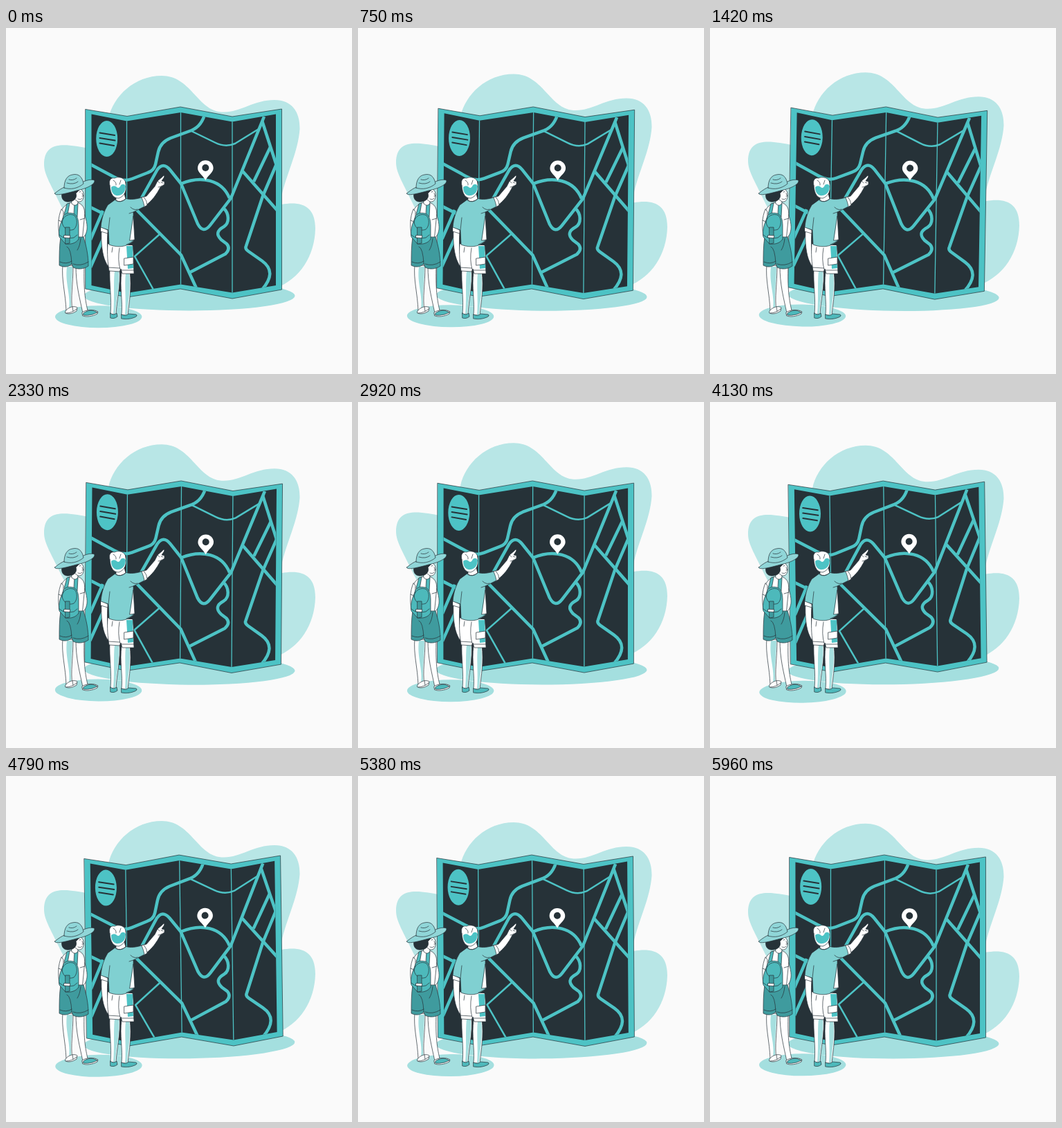
Recreate the animation shown at these times as an HTML page. Size 500x500 px, loop 6000 ms.

```html
<!DOCTYPE html>
<html lang="en">
<head>
<meta charset="utf-8">
<title>Travellers at a map</title>
<style>
  html, body { margin: 0; width: 100%; height: 100%; overflow: hidden; background: #fafafa; }
  svg { display: block; width: 100%; height: 100%; }
  .ink { stroke: #263238; stroke-width: .7; stroke-linejoin: round; stroke-linecap: round; }
  .line { fill: none; }
  .white { fill: #fff; }
  .dark { fill: #263238; }
  .teal { fill: #4dc3c5; }
  .cloth { fill: #80d0d1; }
  .hat { fill: #90d6d8; }
  .pack { fill: #4db9bb; }
  .deep { fill: #3f9b9e; }
  .pale { fill: #a5dfdf; stroke: none; }
  .road { fill: none; stroke: #4dc3c5; stroke-width: 4.5; stroke-linejoin: round; }
  .thin { stroke-width: 2.5; }
  .fold { stroke-width: 1.3; }
</style>
</head>
<body>
<svg viewBox="0 0 500 500">
  <defs>
    <clipPath id="panels">
      <path id="sheet" d="M123.500 124.500L174.500 134.500 252.500 122 327 135.500 390 124.500V372L327 382.500 252.500 370.500 174.500 383 123.500 372Z"/>
    </clipPath>
  </defs>

  <path id="blob" fill="#b8e6e6" d="M148 131C155 98 186 69 225 69C266 69 276 116 308 121C335 125 356 104 388 104C413 104 425 121 424.500 146C422 180 406 208 398 244V255C427 250 447 257 447 290C446 330 425 362 390 376L200 350C160 340 100 300 80 258C66 228 55 212 55 197C55 161 88 168 120 174Z"/>

  <g id="shadow" fill="#a4dfdf">
    <ellipse cx="265" cy="387" rx="152.500" ry="21.500"/>
    <ellipse cx="133.700" cy="417.300" rx="62.700" ry="16"/>
  </g>

  <g id="map">
    <path class="teal ink" d="M115 117.500L175 127.500 252 114 327 128 398.500 117V378L327 391 252 377 175 389 115 377Z"/>
    <use href="#sheet" class="dark"/>
    <g clip-path="url(#panels)">
      <path class="road" d="M118 195L150 212C164 220 172 222 182 218L205 209Q214 206 216 197L220 179Q223 165 238 159L268 148Q283 142 288 122"/>
      <path class="road" d="M189 258L218.500 205Q227 193 237 205L253 225 277 283Q285 298 295 285L325 246 373 128"/>
      <path class="road" d="M253 225C282 213 312 219 323 246"/>
      <path class="road thin" d="M266 148L302 165.500Q317 173 331 167L365 146"/>
      <path class="road" d="M370 134L392 202"/>
      <path class="road" d="M382 172L358 222M392 194L371 243L347 315Q345 319 350 322.500L370 336.500C386 348 384 362 370 378"/>
      <path class="road" d="M342 207L394 266"/>
      <path class="road" d="M314 260C323 268 323 282 315 287C304 293 304 299 311 306L319 312Q325 319 317 326.500L266 353"/>
      <path class="road" d="M180 254L253 328 276 378"/>
      <path class="road thin" d="M222 298L186 330 213 378"/>
      <path class="road" d="M118 257L150 273M140 264L122 306M122 346L146 292"/>
      <path class="road fold" d="M174.500 128V388M252.500 115V377M327 129V390"/>
    </g>
    <ellipse class="teal" cx="145.700" cy="160" rx="15.500" ry="26"/>
    <path class="line" stroke="#263238" stroke-width="2" stroke-linecap="round" d="M135.500 151.500L157 155M135.500 159L157.500 162.500M135.500 166.500L156 170"/>
    <path class="white" d="M288.300 220C284 212 277 209 277 202.500A11.300 11.300 0 0 1 299.600 202.500C299.600 209 292.500 212 288.300 220Z"/>
    <circle class="dark" cx="288.300" cy="202" r="5"/>
  </g>

  <g id="woman" class="ink">
    <path class="white" d="M82 342C80 365 86 382 87 409L96 408C93 390 97 370 97 344Z"/>
    <path class="pale" d="M88 345L96 345C96 370 92 388 95 407L91 407C94 385 85 370 88 345Z"/>
    <path class="white" d="M101 344C101 371 106 388 111 412L119 412C114 393 112 376 113 343Z"/>
    <path class="white" d="M86 409C90 403 99 401 103 404L102 409C96 413 90 414 86 412Z"/>
    <path class="white" d="M110 411C115 407 127 406 133 410L132 413C125 417 116 418 111 416Z"/>
    <path class="line" d="M87 412Q95 412 102 406M96 403L97 409"/>
    <path class="pack" d="M112 412C119 407 126 407 132 411L125 414Q117 416 112 415Z"/>
    <path class="white" d="M109 260C114 268 118 282 117 291C116 299 112 304 108 303L106 274Z"/>
    <path class="white" d="M81 262C87 253 95 250 105 253C113 256 115 264 113 277L110 308 80 308Z"/>
    <path class="white" d="M80 262C75 273 75 286 77 300L82 301 83 266Z"/>
    <path class="line" d="M107 277L114 275M76 278L81 280"/>
    <path class="deep" d="M79 302L112 302C116 315 119 328 119 344C111 349 104 349 97 346L95 341C90 346 83 346 77 343C77 328 77 315 79 302Z"/>
    <path class="line" d="M88 316Q94 318 95 341M108 304Q107 315 103 321M78 338Q87 342 95 337M97 341Q108 345 119 338"/>
    <path class="pack" d="M84 269L88 254 92 253 89 270ZM98 269L99 252 104 254 103 273Z"/>
    <path class="pack" d="M82 275C83 268 90 266 97 268C103 270 105 277 105 286V305C101 311 94 313 86 312L77 302C75 292 79 282 82 275Z"/>
    <path class="line" d="M81 281C82 271 92 267 99 271C104 276 103 287 98 291C91 294 83 291 81 281ZM77 299Q84 306 98 303L103 299"/>
    <path class="deep" d="M86 288H92V311L86 312Z"/>
    <path class="white" d="M84 299.500L93 300 92 303.500 84 303Z"/>
    <path class="white" d="M94 243L95 254Q101 259 104 253L103 245Z"/>
    <path class="white" d="M97 233C103 230 111 232 112 239C113 247 110 252 104 251L96 245Z"/>
    <path class="dark" d="M81 237C79 247 83 252 92 251C100 250 103 244 101 239L106 234 90 230Z"/>
    <path class="line" d="M106 237L108 236.500M110 239L112 243 110 243M104 247Q108 249 110 246"/>
    <path class="hat" d="M70.500 239C76 234 82 231 86 229L112 222C121 218 128 219 128 221C128 226 117 232 102 235C84 240 70 243 70.500 239Z"/>
    <path class="hat" d="M84 231C84 219 89 213 96 212C104 210 110 214 112 225C104 232 93 234 84 231Z"/>
    <path class="line" d="M88 224Q98 227 104 222M91 219Q97 221 102 217"/>
  </g>

  <g id="man" class="ink">
    <path class="white" d="M150 348C149 370 153 389 151 414L159 414C160 393 166 372 164 348Z"/>
    <path class="pale" d="M157 350H163C165 373 159 392 158 413L155 413C157 390 155 370 157 350Z"/>
    <path class="white" d="M167 352C164 376 169 393 167 415L176 415C178 395 182 376 179 352Z"/>
    <path class="pale" d="M173 354H178C181 377 176 394 175 415L172 415C174 392 171 373 173 354Z"/>
    <path class="pack" d="M151 412Q155 416 160 412L161 417Q156 421 151 419Z"/>
    <path class="pack" d="M167 414Q174 417 177 413L188 414Q191 416 186 418C179 421 172 421 167 420Z"/>
    <path class="white" d="M138 291C137 309 139 328 144 338L147 344 150 338C146 326 146 309 147 294Z"/>
    <path class="white" d="M147 312C146 327 147 339 149 351L164 352 166 348 168 355 185 355C184 340 185 328 183 314Z"/>
    <path class="teal" stroke="none" d="M174 315H183L184 347 176 348Z"/>
    <path class="white" d="M171 333L184 331V341L171 343Z"/>
    <path class="line" d="M164 318Q161 335 165 349M148 346L164 347M167 350L185 350M154 317L153 324"/>
    <path class="white" d="M195 245L203 243 215 229 219 221 225 216 228 213Q230 214 227 218L225 221 229 222 229 226 223 230C218 240 211 250 201 257Z"/>
    <path class="line" d="M219 221L222 224M224 223L227 224M220 230Q223 230 225 228"/>
    <path class="white" d="M194 245L199 244Q204 250 204 256L199 259Z"/>
    <path class="white" d="M137 287L147 292 147 297 137 294Z"/>
    <path class="cloth" d="M158 248L172 246C181 249 188 247 196 245Q199 252 200 258L184 266 185 307C174 318 159 317 149 313L148 292 137 288C138 275 142 264 147 256Z"/>
    <path class="white" d="M184 272L186 306 179 307Z"/>
    <path class="line" d="M148 292L150 274M184 266L178 268M190 262Q185 264 180 259M174 313Q181 311 185 306"/>
    <path class="white" d="M159 240L159 249Q165 253 173 247L171 240Z"/>
    <path class="line" d="M158 249Q165 254 173 247"/>
    <path class="white" d="M150 228C148 219 152 216 157 217C162 214 173 216 173 225C175 233 172 243 163 246C155 246 151 240 150 228Z"/>
    <path class="teal" stroke="none" d="M152 230Q155 227 159 229Q163 234 166 227Q170 224 173 228C173 236 169 241 163 242C156 243 152 238 152 230Z"/>
    <path class="line" d="M150 235Q148 239 153 241M155 220Q160 223 159 227M166 220L164 226"/>
  </g>
</svg>
<script>
  const LOOP = 6000;
  const [blob, shadow, map] = ['blob', 'shadow', 'map'].map(id => document.getElementById(id));

  // Triangle wave: 0, 1, 0, -1, 0 over one turn.
  const sway = p => 1 - 4 * Math.abs((p + .25) % 1 - .5);
  const rotate = (el, angle, x, y) => el.setAttribute('transform', `rotate(${angle} ${x} ${y})`);

  function draw() {
    const p = performance.now() % LOOP / LOOP;
    const lift = 10 * (1 - Math.abs(2 * p - 1));
    blob.setAttribute('transform', `translate(0 ${-lift})`);
    rotate(map, sway(p), 256.7, 252.5);
    rotate(shadow, sway(p), 244, 399);
    requestAnimationFrame(draw);
  }
  draw();
</script>
</body>
</html>
```
